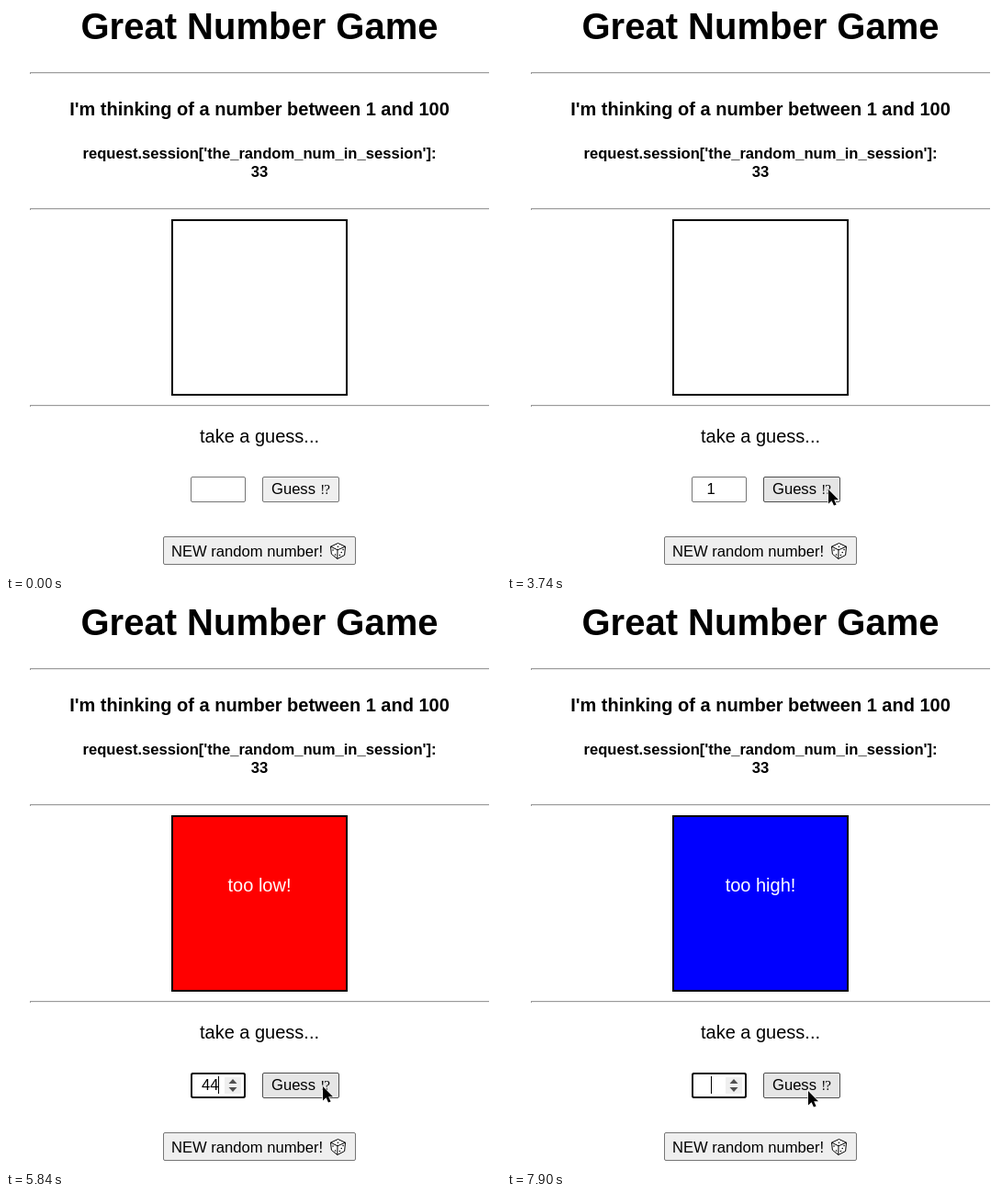
Animation, 539 px wide and 618 px high, one loop 7.99 s. Source, as an HTML page:

```html
<!DOCTYPE html>
<html lang="en">
<head>
<meta charset="utf-8">
<title>Great Number Game</title>
<style>
html, body { margin: 0; width: 100%; height: 100%; overflow: hidden; background: #fff; }
svg { display: block; font: 20px "Liberation Sans", Arial, sans-serif; }
.mid { text-anchor: middle; }
.bold { font-weight: bold; }
.small { font-size: 16.6px; }
.field { fill: #fff; stroke: #767676; }
.button { fill: #efefef; stroke: #767676; }
.pips { fill: none; stroke: #000; stroke-width: 1.5; stroke-linecap: round; }

/* every animated part shares one clock */
.anim { animation: 7.99s step-end infinite; }
.off { opacity: 0; }
#mouse { animation-name: move; animation-timing-function: steps(2); }
#arrow { animation-name: arrow; }
#beam { animation-name: beam; }
#ring { animation-name: ring; }
#spin { animation-name: spin; }
#caret { animation-name: caret; }
#one { animation-name: one; }
#four { animation-name: four; }
#fours { animation-name: fours; }
#low { animation-name: low; }
#high { animation-name: high; }
#guess { animation-name: hover; }

@keyframes move {
  0%, 4.42% { transform: translate(492px, 618px); }
  6.35% { transform: translate(448px, 571px); }
  8.27% { transform: translate(404px, 541px); }
  10.2% { transform: translate(340px, 505px); }
  12.13% { transform: translate(276px, 504px); }
  14.05% { transform: translate(232px, 524px); }
  15.9%, 18.84% { transform: translate(222px, 533px); }
  18.85% { transform: translate(219px, 526px); }
  20.8% { transform: translate(240px, 515px); }
  22.74% { transform: translate(310px, 488px); }
  24.69% { transform: translate(365px, 484px); }
  26.65% { transform: translate(398px, 486px); }
  27.6%, 30.54% { transform: translate(401px, 484px); }
  32.5% { transform: translate(403px, 490px); }
  34.4% { transform: translate(402px, 500px); }
  36.3% { transform: translate(396px, 509px); }
  38.25% { transform: translate(386px, 515px); }
  39.36%, 40.2% { transform: translate(382px, 517px); }
  41.17%, 41.25% { transform: translate(379px, 517px); }
  43.1% { transform: translate(364px, 521px); }
  44.96%, 51.8% { transform: translate(350px, 526px); }
  53.77% { transform: translate(346px, 512px); }
  54.63% { transform: translate(343px, 505px); }
  56.6% { transform: translate(316px, 497px); }
  58.5% { transform: translate(262px, 510px); }
  60.4%, 61.6% { transform: translate(230px, 526px); }
  63.5% { transform: translate(232px, 524px); }
  65.4% { transform: translate(316px, 507px); }
  67.3%, 68.2% { transform: translate(366px, 511px); }
  70.2% { transform: translate(367px, 516px); }
  72.2% { transform: translate(354px, 524px); }
  73.04%, 78.4% { transform: translate(345px, 527px); }
  80.06% { transform: translate(373px, 515px); }
  82% { transform: translate(384px, 511px); }
  84.1%, 85.3% { transform: translate(388px, 513px); }
  87.2% { transform: translate(380px, 508px); }
  89.2% { transform: translate(345px, 501px); }
  91.1% { transform: translate(290px, 505px); }
  93.1% { transform: translate(240px, 530px); }
  95% { transform: translate(222px, 539px); }
  96%, 97% { transform: translate(224px, 530px); }
  98.8%, 100% { transform: translate(328px, 532px); }
}
@keyframes arrow {
  0%, 13.09%, 59.49%, 93.1% { opacity: 0; }
  5.36%, 21.77%, 64.45%, 97.88%, 100% { opacity: 1; }
}
@keyframes beam {
  0%, 21.77%, 64.45%, 97.88%, 100% { opacity: 0; }
  13.09%, 59.49%, 93.1% { opacity: 1; }
}
@keyframes ring {
  0%, 45.87%, 77.1% { opacity: 0; }
  15.85%, 62.53%, 96.95%, 100% { opacity: 1; }
}
@keyframes spin {
  0%, 45.87%, 77.1% { opacity: 0; }
  13.09%, 59.49%, 93.1%, 100% { opacity: 1; }
}
@keyframes caret {
  0%, 22.6%, 42.5%, 77.1% { opacity: 0; transform: none; }
  15.85%, 29.6%, 62.53%, 96.95%, 100% { opacity: 1; transform: none; }
  36.2%, 69.16% { opacity: 1; transform: translateX(4px); }
  71.16% { opacity: 1; transform: translateX(9px); }
}
@keyframes one { 0%, 49.89%, 100% { opacity: 0; } 36.2% { opacity: 1; } }
@keyframes four { 0%, 71.16%, 100% { opacity: 0; } 69.16% { opacity: 1; } }
@keyframes fours { 0%, 79.17%, 100% { opacity: 0; } 71.16% { opacity: 1; } }
@keyframes low { 0%, 79.17%, 100% { opacity: 0; } 49.89% { opacity: 1; } }
@keyframes high { 0% { opacity: 0; } 79.17%, 100% { opacity: 1; } }
@keyframes hover {
  0%, 54.2%, 80.06% { fill: #efefef; stroke: #767676; }
  44%, 46.8%, 71.2%, 78.1%, 98.8%, 100% { fill: #e5e5e5; stroke: #4f4f4f; }
  45.87%, 77.1% { fill: #f5f5f5; stroke: #8d8d8d; }
}
</style>
</head>
<body>
<svg width="539" height="618" viewBox="0 0 539 618">
  <defs>
    <g id="rule" shape-rendering="crispEdges">
      <path d="M26 0h500v2H26z" fill="#eee"/>
      <path d="M26 0h500v1H27v1H26z" fill="#9a9a9a"/>
    </g>
  </defs>

  <text class="mid bold" x="276" y="36" font-size="40">Great Number Game</text>
  <use href="#rule" y="72"/>
  <text class="mid bold" x="276" y="119">I'm thinking of a number between 1 and 100</text>
  <g class="mid bold small">
    <text x="276" y="166">request.session['the_random_num_in_session']:</text>
    <text x="276" y="186">33</text>
  </g>
  <use href="#rule" y="220"/>

  <rect x="181" y="233" width="190" height="190" fill="#fff" stroke="#000" stroke-width="2"/>
  <g id="low" class="anim off mid">
    <path d="M182 234h188v188H182z" fill="#f00"/>
    <text x="276" y="315" fill="#fff">too low!</text>
  </g>
  <g id="high" class="anim off mid">
    <path d="M182 234h188v188H182z" fill="#00f"/>
    <text x="276" y="315" fill="#fff">too high!</text>
  </g>
  <use href="#rule" y="434"/>
  <text class="mid" x="276" y="475">take a guess...</text>

  <rect class="field" x="201.5" y="512.5" width="59" height="27" rx="1.5"/>
  <g id="spin" class="anim off">
    <path d="M238 517h18v18H238z" fill="#efefef"/>
    <path d="M242.5 524l4.5-5 4.5 5zM242.5 528l4.5 5 4.5-5z" fill="#505050"/>
  </g>
  <rect id="ring" class="anim off" x="202" y="513" width="58" height="26" rx="2" fill="none" stroke="#101010" stroke-width="2"/>
  <g class="mid small">
    <text id="one" class="anim off" x="222.2" y="531">1</text>
    <text id="four" class="anim off" x="222.2" y="531">4</text>
    <text id="fours" class="anim off" x="222.2" y="531">44</text>
  </g>
  <path id="caret" class="anim off" d="M222 516h1v19h-1z"/>

  <rect id="guess" class="anim button" x="279.5" y="512.5" width="83" height="27" rx="1.5"/>
  <text class="small" x="289" y="531">Guess</text>
  <text x="342.3" y="531" font-size="15" font-family="'Liberation Serif', serif" letter-spacing="-1">!?</text>

  <rect class="button" x="171.5" y="577.5" width="209" height="30" rx="1.5"/>
  <text class="small" x="180" y="599">NEW random number!</text>
  <g fill="none" stroke="#000" stroke-linejoin="round">
    <path d="M361.5 584.5l8 3.7-.9 9.3-7.8 4-6.4-5.2-.9-8.1z" fill="#fff"/>
    <path d="M353.5 588.2l7.5 3.6 8.5-3.6M361 591.8l-.2 9.7"/>
  </g>
  <path class="pips" d="M361.4 588.2h.1M356 592h0.1M358.5 597h.1M363.4 597.6h.1M365.2 594.6h.1M367 591.6h.1"/>

  <g id="mouse" class="anim">
    <path id="arrow" class="anim off" d="M0 0V15.5L3.6 12.2 6 17.6 8.6 16.5 6.2 11.2H11Z" stroke="#fff" stroke-width="1.4" paint-order="stroke"/>
    <g id="beam" class="anim off" fill="none" stroke="#333" shape-rendering="crispEdges">
      <path d="M-4 -7.5h3M1 -7.5h3M-4 8.5h3M1 8.5h3"/>
      <path d="M.5 -7v15" stroke-dasharray="1 1"/>
    </g>
  </g>
</svg>
</body>
</html>
```
